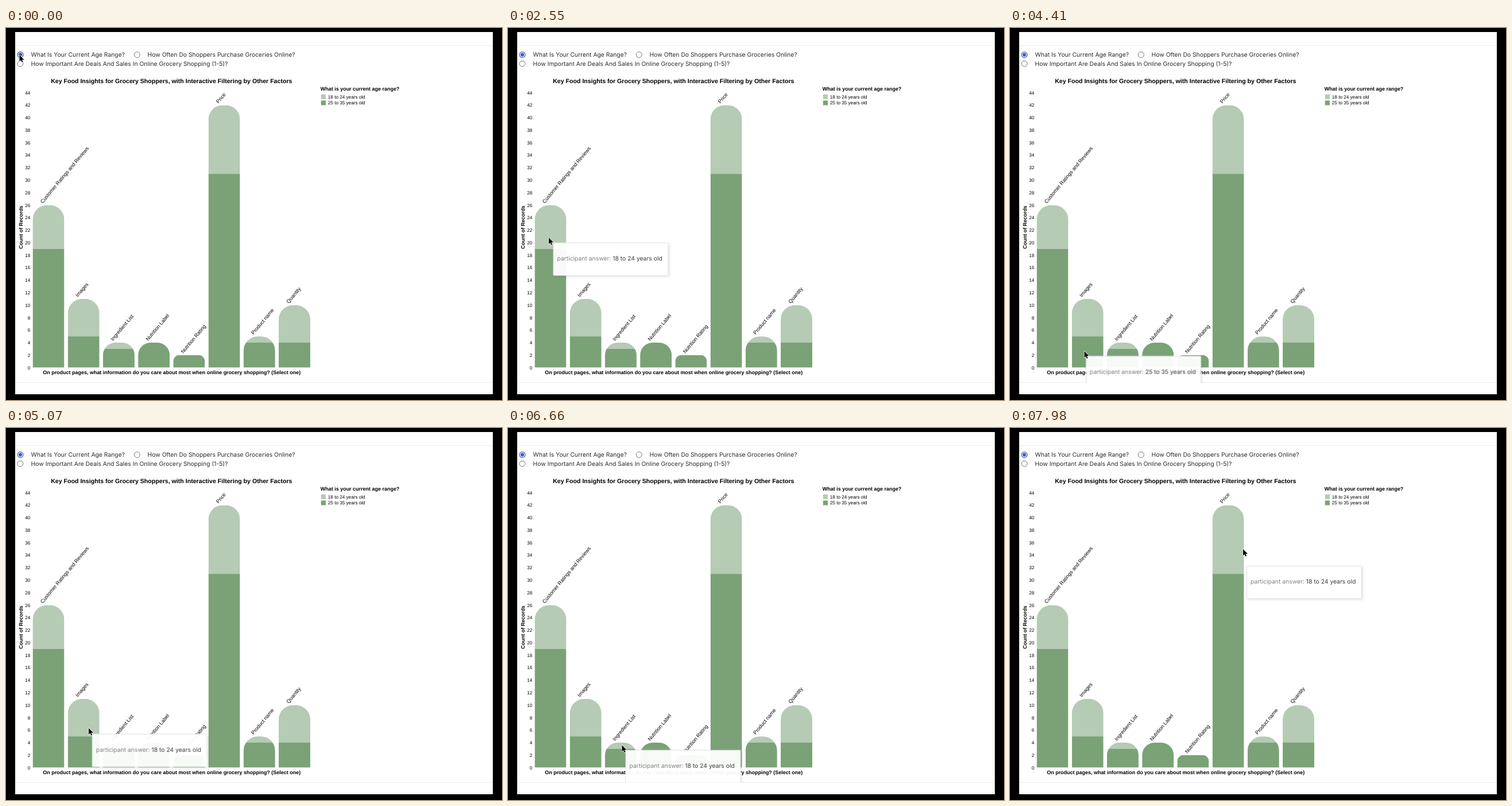
Write an HTML page that moves like this. It is 864 px wide and 648 px high and loops after 8 s.

```html
<!DOCTYPE html>
<html lang="en">
<head>
<meta charset="utf-8">
<title>Grocery survey chart</title>
<style>
  html, body { margin: 0; width: 100%; height: 100%; overflow: hidden; background: #000; }
  svg { position: absolute; left: 0; top: 0; }
  text { font-family: "Liberation Sans", Arial, sans-serif; text-rendering: geometricPrecision; }
  .title { font-size: 10.62px; font-weight: bold; }
  .head { font-size: 8.98px; font-weight: bold; }
  .bar { font-size: 8.98px; }
  .small { font-size: 8.17px; }
  .radio, #tip { font: 10.35px Inter, "Open Sans", sans-serif; }
  .radio { fill: #2b2b2b; }
  #clip { position: absolute; left: 0; top: 0; width: 864px; height: 618px; overflow: hidden; }
  #tip {
    position: absolute; left: 0; top: 0; box-sizing: border-box; width: 200.5px; height: 57.5px;
    padding-left: 6px; line-height: 55.5px; white-space: nowrap; color: #808080;
    background: rgba(255, 255, 255, .95); border: 1px solid #e0e0e0; border-radius: 2px;
    box-shadow: 2px 2px 4px rgba(0, 0, 0, .1); will-change: transform;
    text-rendering: geometricPrecision;
  }
  #tip b { font-weight: 400; color: #3c3c3c; }
</style>
</head>
<body>
<svg id="chart" width="864" height="648"></svg>
<div id="clip"><div id="tip">participant answer: <b id="answer"></b></div></div>
<svg width="864" height="648">
  <path id="cursor" d="M0 0V11.3L2.6 8.9 4.3 12.8 6.1 12 4.4 8.3H8Z"
        stroke="#fff" stroke-width="1.4" paint-order="stroke" stroke-linejoin="round"/>
</svg>
<script>
const $ = id => document.getElementById(id);
const LIGHT = '#b5cbb4', DARK = '#7ba277';
const AGES = ['18 to 24 years old', '25 to 35 years old'];
const BASE = 591.6, UNIT = 10.886, WIDTH = 55;

// name, total count, count of the older group
const bars = [
  ['Customer Ratings and Reviews', 26, 19], ['Images', 11, 5], ['Ingredient List', 4, 3],
  ['Nutrition Label', 4, 4], ['Nutrition Rating', 2, 2], ['Price', 42, 31],
  ['Product name', 5, 4], ['Quantity', 10, 4]
].map(([name, total, older], i) => ({
  name, x: 46.5 + i * 61.22, top: BASE - total * UNIT, split: BASE - older * UNIT
}));

const text = (cls, x, y, str, extra = '') =>
  `<text class="${cls}" x="${x}" y="${y}" ${extra}>${str}</text>`;
const rect = (x, y, w, h, fill, extra = '') =>
  `<rect x="${x}" y="${y}" width="${w}" height="${h}" fill="${fill}" ${extra}/>`;
const ring = (x, y, extra = 'stroke="#767676"') =>
  `<circle cx="${x}" cy="${y}" r="5" fill="none" ${extra}/>`;
const MID = 'text-anchor="middle"';

function drawBar({ name, x, top, split }, i) {
  const r = Math.min(25, (BASE - top) / 2), clip = `clip-path="url(#c${i})"`;
  return `<clipPath id="c${i}"><path d="M${x} ${BASE}V${top + r}a${r} ${r} 0 0 1 ${r} ${-r}` +
    `h${WIDTH - 2 * r}a${r} ${r} 0 0 1 ${r} ${r}V${BASE}Z"/></clipPath>` +
    `<g ${clip}>` + rect(x, top, WIDTH, split - top, LIGHT) +
    rect(x, split, WIDTH, BASE - split, DARK) + '</g>' +
    text('bar', 0, 0, name, `transform="translate(${x + 17.5} ${top - 2.6}) rotate(-50)"`);
}

let out = rect(16, 7, 832, 631, '#fff') + rect(16, 30, 832, 1, '#eee') + rect(16, 617, 832, 1, '#eee');
out += ring(25, 46.6, 'id="ring" stroke-width="1.2"') + '<circle id="dot" cx="25" cy="46.6" r="3.1"/>' +
  ring(228.3, 46.6) + ring(25, 62.2);
out += text('radio', 43.6, 50.2, 'What Is Your Current Age Range?') +
  text('radio', 246.6, 50.2, 'How Often Do Shoppers Purchase Groceries Online?') +
  text('radio', 43.6, 65.8, 'How Important Are Deals And Sales In Online Grocery Shopping (1-5)?');
out += text('title', 288.3, 96.2, 'Key Food Insights for Grocery Shoppers, with Interactive Filtering by Other Factors', MID) +
  text('head', 288.7, 603.2, 'On product pages, what information do you care about most when online grocery shopping? (Select one)', MID) +
  text('head', 0, 0, 'Count of Records', MID + ' transform="translate(28.6 347) rotate(-90)"');
for (let n = 0; n <= 44; n += 2)
  out += text('small', 42.4, BASE - n * UNIT + 3, n, 'text-anchor="end"');
out += text('head', 547.8, 109.2, 'What is your current age range?');
AGES.forEach((age, i) => {
  const y = 115.7 + i * 10.6;
  out += rect(548.8, y, 8.2, 8.2, i ? DARK : LIGHT) + text('small', 560.8, y + 6.9, age);
});
$('chart').innerHTML = out + bars.map(drawBar).join('');

// pointer path: time, x, y
const path = [
  [0, 23.5, 47], [1050, 23.5, 47], [1110, 24, 48.5], [1950, 24, 48.5],
  [2250, 60, 200], [2430, 74.5, 345], [2520, 71, 365], [2850, 71, 365],
  [3120, 75.5, 425], [3750, 75.5, 425], [3900, 64.5, 485.5], [3930, 66, 498],
  [4380, 124.5, 562.5], [4410, 129.5, 563], [4470, 135.5, 563.5], [4650, 135.5, 563.5],
  [4950, 138, 530], [5220, 154, 520], [5430, 168, 536], [5580, 184, 547.5],
  [6060, 198.5, 553], [6300, 198.5, 553], [6660, 198.5, 552.5], [7050, 242.5, 565],
  [7110, 242.5, 565], [7350, 300, 520], [7600, 375, 400], [7860, 403, 247],
  [7920, 403, 247], [7950, 404.5, 231], [7980, 406, 211]
];

const same = (a, b) => a[1] === b[1] && a[2] === b[2];

// speed at key i, zero beside a pause
function slope(i, axis) {
  const k = path[i], a = path[i - 1] || k, b = path[i + 1] || k;
  return same(a, k) || same(k, b) ? 0 : (b[axis] - a[axis]) / (b[0] - a[0]);
}

function pointer(t) {
  let i = path.findIndex(k => k[0] > t) - 1;
  if (i < 0) return path[path.length - 1].slice(1);
  const a = path[i], b = path[i + 1], d = b[0] - a[0], u = (t - a[0]) / d, v = 1 - u;
  return [1, 2].map(n =>
    v * v * (1 + 2 * u) * a[n] + u * u * (3 - 2 * u) * b[n] +
    d * u * v * (v * slope(i, n) - u * slope(i + 1, n)));
}

const place = (el, x, y) => { el.style.transform = `translate(${x}px, ${y}px)`; };

function draw(now) {
  const t = Math.floor(now % 8000 / 30) * 30;
  place($('cursor'), ...pointer(t));

  // the tooltip trails the pointer by one step
  const [x, y] = pointer(Math.max(0, t - 30));
  const bar = bars.find(b => x >= b.x && x <= b.x + WIDTH && y >= b.top && y <= BASE);
  $('tip').style.visibility = bar ? 'visible' : 'hidden';
  if (bar) $('answer').textContent = AGES[y < bar.split ? 0 : 1];
  place($('tip'), x + 7.5, y + 8.6);

  const blue = t < 1980 ? '#2f4596' : '#3b5bbd';
  $('ring').setAttribute('stroke', blue);
  $('dot').setAttribute('fill', blue);
}

const start = performance.now();
function tick() {
  draw(performance.now() - start);
  requestAnimationFrame(tick);
}
tick();
</script>
</body>
</html>
```
